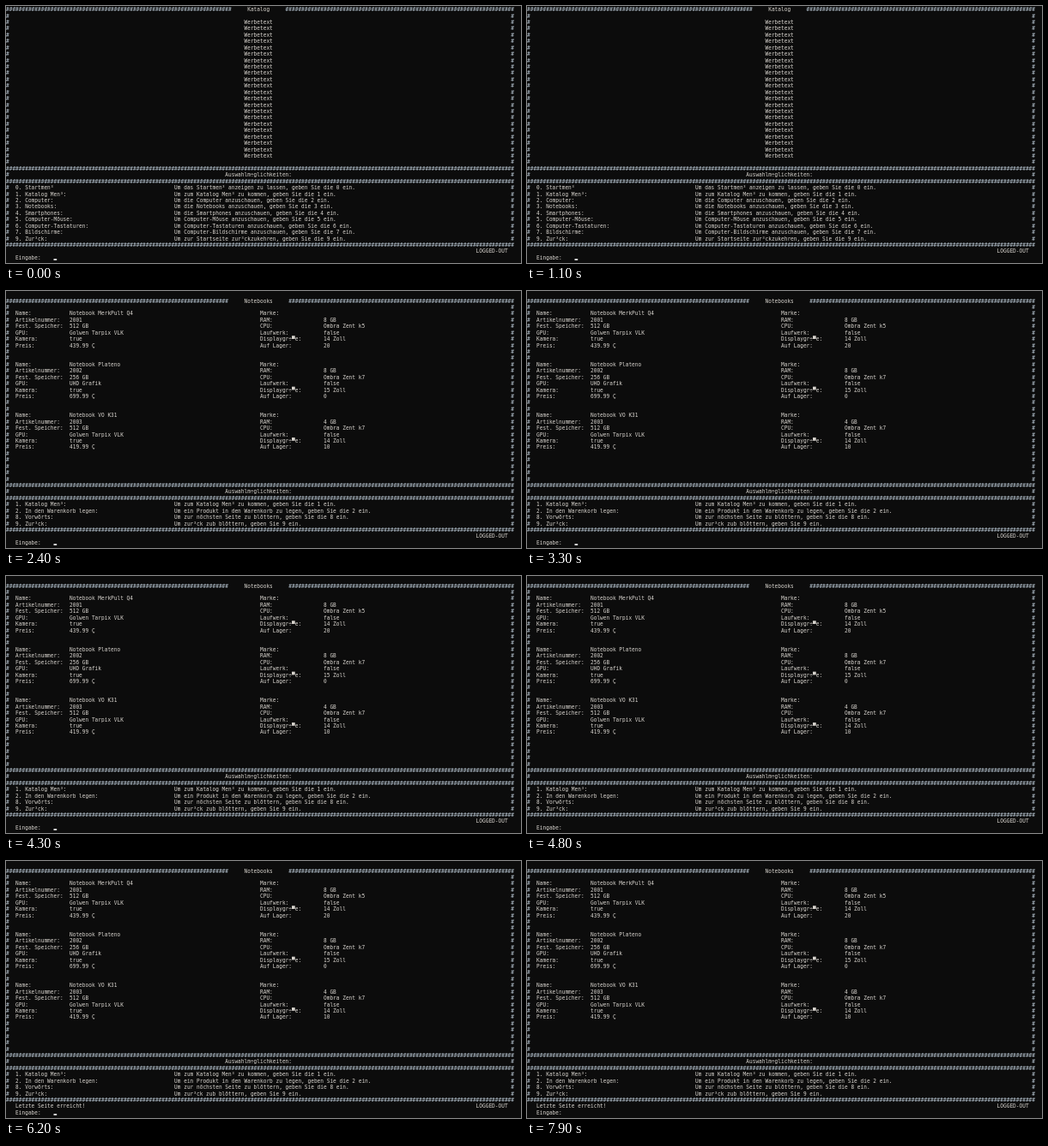
These frames come from a looping animation (600 px wide and 300 px high, 8000 ms). An HTML page with a canvas:

```html
<!DOCTYPE html>
<html lang="de">
<head>
<meta charset="utf-8">
<title>Katalog</title>
<style>
html, body { margin: 0; width: 100%; height: 100%; overflow: hidden; background: #0c0c0c; }
canvas { display: block; }
</style>
</head>
<body>
<canvas id="screen" width="600" height="300"></canvas>
<script>
const ctx = document.getElementById('screen').getContext('2d');
const COLS = 160, ROWS = 40, CELL_W = 3.7, CELL_H = 7.425;
const LOOP = 8000, TICK = 100, BLINK = 530;

// Places pairs of column and text on one line.
function line(...parts) {
  let s = '';
  for (let i = 0; i < parts.length; i += 2) s = s.padEnd(parts[i]) + parts[i + 1];
  return s;
}
const framed = (...parts) => line(0, '#', ...parts, COLS - 1, '#');
const rule = '#'.repeat(COLS);
const blanks = n => Array(n).fill(framed());

function header(title) {
  const gap = ' '.repeat(5), label = gap + title + gap;
  return ('#'.repeat((COLS - label.length) / 2) + label).padEnd(COLS, '#');
}

// The code page turns ö, ä, ü, ß and € into ÷, õ, ³, ▀ and Ç.
function footer(choices, message) {
  return [
    rule,
    framed(69, 'Auswahlm÷glichkeiten:'),
    rule,
    ...choices.map(([label, help]) => framed(3, label, 53, 'Um ' + help + ' ein.')),
    rule,
    line(3, message, 148, 'LOGGED-OUT'),
    line(3, 'Eingabe:    ')
  ];
}

const show = (n, name, goods = 'die ' + name) =>
  [`${n}. ${name}:`, `${goods} anzuschauen, geben Sie die ${n}`];

const catalog = [
  header('Katalog'),
  framed(),
  ...Array(22).fill(framed(75, 'Werbetext')),
  framed(),
  ...footer([
    ['0. Startmen³', 'das Startmen³ anzeigen zu lassen, geben Sie die 0'],
    ['1. Katalog Men³:', 'zum Katalog Men³ zu kommen, geben Sie die 1'],
    show(2, 'Computer'),
    show(3, 'Notebooks'),
    show(4, 'Smartphones'),
    show(5, 'Computer-Mõuse', 'Computer-Mõuse'),
    show(6, 'Computer-Tastaturen', 'Computer-Tastaturen'),
    show(7, 'Bildschirme', 'Computer-Bildschirme'),
    ['9. Zur³ck:', 'zur Startseite zur³ckzukehren, geben Sie die 9']
  ], '')
];

function product(name, id, disk, gpu, price, ram, cpu, inches, stock) {
  return [
    ['Name:', 'Notebook ' + name, 'Marke:', ''],
    ['Artikelnummer:', id, 'RAM:', ram + ' GB'],
    ['Fest. Speicher:', disk + ' GB', 'CPU:', 'Ombra Zent ' + cpu],
    ['GPU:', gpu, 'Laufwerk:', 'false'],
    ['Kamera:', 'true', 'Displaygr÷▀e:', inches + ' Zoll'],
    ['Preis:', price + ' Ç', 'Auf Lager:', stock]
  ].map(([a, b, c, d]) => framed(3, a, 20, b, 80, c, 100, d));
}

const notebooks = message => [
  '',
  header('Notebooks'),
  framed(),
  ...product('MerkPult Q4', 2001, 512, 'Golwen Tarpix VLK', '439.99', 8, 'k5', 14, 20),
  ...blanks(2),
  ...product('Plateno', 2002, 256, 'UHD Grafik', '699.99', 8, 'k7', 15, 0),
  ...blanks(2),
  ...product('VO K31', 2003, 512, 'Golwen Tarpix VLK', '419.99', 4, 'k7', 14, 10),
  ...blanks(5),
  ...footer([
    ['1. Katalog Men³:', 'zum Katalog Men³ zu kommen, geben Sie die 1'],
    ['2. In den Warenkorb legen:', 'ein Produkt in den Warenkorb zu legen, geben Sie die 2'],
    ['8. Vorwõrts:', 'zur nõchsten Seite zu blõttern, geben Sie die 8'],
    ['9. Zur³ck:', 'zur³ck zub blõttern, geben Sie 9']
  ], message)
];

const lastPage = notebooks('Letzte Seite erreicht!');
const inputs = [
  { key: '3', typed: 1500, sent: 1800, page: notebooks('') },
  { key: '8', typed: 4900, sent: 5100, page: lastPage },
  { key: '8', typed: 5800, sent: 6000, page: lastPage }
];

function terminal(t) {
  const lines = [...catalog];
  let since = 0;
  for (const { key, typed, sent, page } of inputs) {
    if (t < typed) break;
    lines[lines.length - 1] += key;
    since = typed;
    if (t < sent) break;
    if (t === sent) { // output is still being printed
      lines.push(...page.slice(0, 7), page[7].slice(0, 143));
      since = t;
      break;
    }
    lines.push(...page);
    since = sent + TICK;
  }
  return { lines: lines.slice(-ROWS), cursor: Math.floor((t - since) / BLINK) % 2 === 0 };
}

function draw(t) {
  const { lines, cursor } = terminal(t);
  ctx.fillStyle = '#0c0c0c';
  ctx.fillRect(0, 0, 600, 300);
  ctx.save();
  ctx.scale(0.1, 0.1); // keeps glyph positions fractional
  ctx.font = '61.4px "DejaVu Sans Mono", "Noto Sans Mono", monospace';
  lines.forEach((text, row) => [...text].forEach((ch, col) => {
    const x = col * CELL_W * 10, y = row * CELL_H * 10;
    ctx.fillStyle = ch === '#' ? '#bccad6' : '#d8d4ce';
    if (ch === '▀') ctx.fillRect(x, y + 3, CELL_W * 10, 37);
    else if (ch !== ' ') ctx.fillText(ch, x, y + 62);
  }));
  ctx.restore();
  if (cursor) {
    ctx.fillStyle = '#fff';
    ctx.fillRect(lines[ROWS - 1].length * CELL_W, (ROWS - 1) * CELL_H + 5.6, CELL_W, 1.6);
  }
}

let shown = -1;
function frame() {
  const t = Math.floor(performance.now() % LOOP / TICK) * TICK;
  if (t !== shown) draw(shown = t);
  requestAnimationFrame(frame);
}
frame();
</script>
</body>
</html>
```
